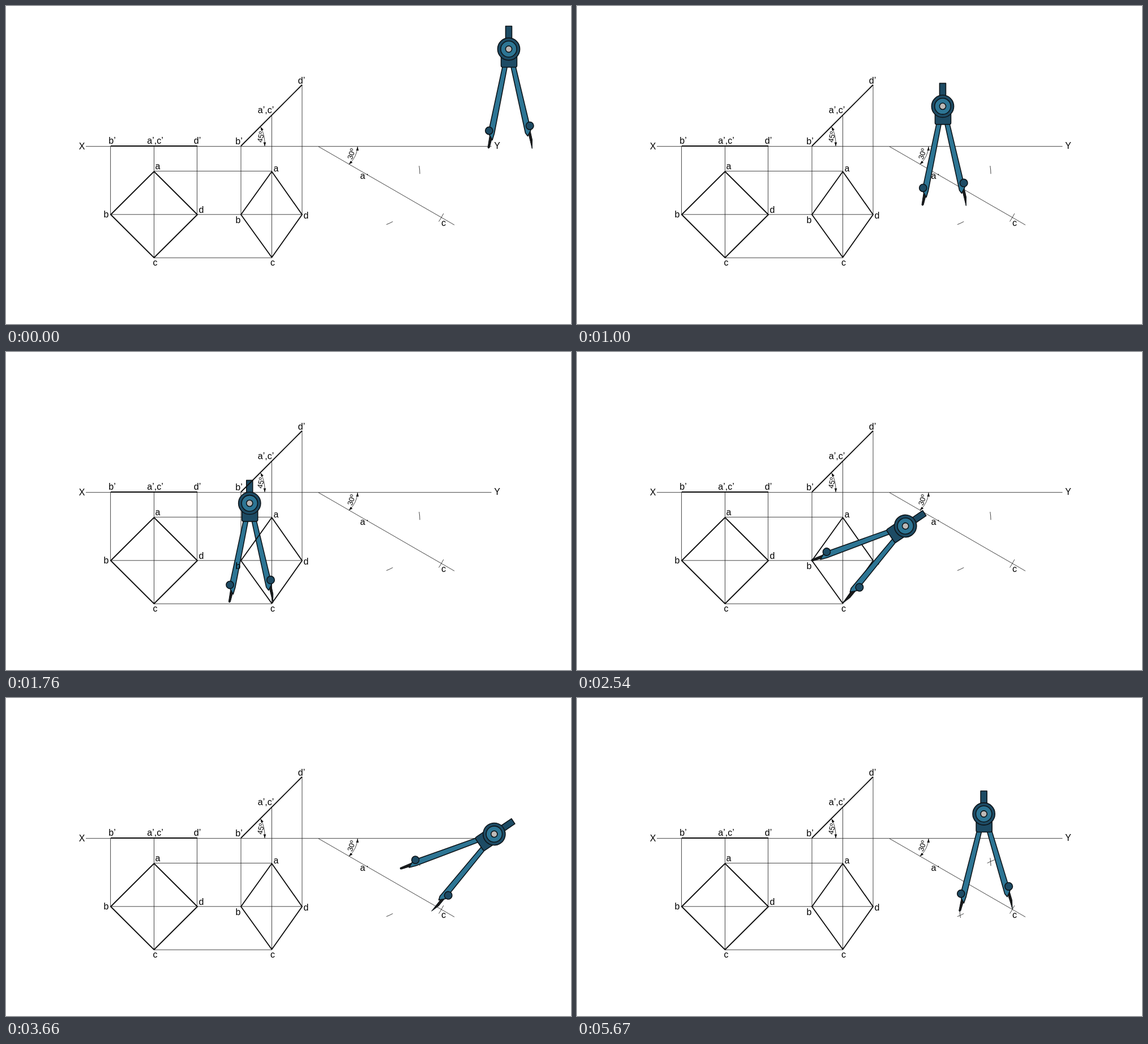
An HTML page for the animation above (5.71 s loop, 998 by 561 pixels).

```html
<!DOCTYPE html>
<html lang="en">
<head>
<meta charset="utf-8">
<title>Compass construction</title>
<style>
  html, body { margin: 0; width: 100%; height: 100%; overflow: hidden; background: #fff; }
  svg { display: block; width: 100vw; height: 100vh; }
  text { font-family: "Liberation Sans", Arial, sans-serif; font-size: 16px; text-anchor: middle; fill: #000; }
  .angle { font-size: 13px; }
  .thin { fill: none; stroke: #222; stroke-width: .85; }
  .bold { fill: none; stroke: #111; stroke-width: 1.9; stroke-linejoin: round; }
  .compass * { stroke: #0d1419; stroke-width: 1.6; stroke-linejoin: round; }
  .dark { fill: #1d4b64; }
  .blue { fill: #2d7594; }
  .grey { fill: #bdb9b7; }
  .needle { fill: #1a1a1a; }
  .compass .needle { stroke-width: 1; }
</style>
</head>
<body>
<svg viewBox="0 0 998 561">
  <g id="lines"></g>
  <g id="closed" class="compass"></g>
  <g id="shapes"></g>
  <g id="open" class="compass"></g>
</svg>
<script>
const $ = id => document.getElementById(id);
const RAD = Math.PI / 180;
const LOOP = 5710, STEP = 40;

const path = (d, cls, extra = '') => `<path d="${d}" class="${cls}" ${extra}/>`;
const label = ([s, x, y]) => `<text x="${x}" y="${y}">${s}</text>`;

function arc(cx, cy, r, from, to, extra) {
  const at = a => `${cx + r * Math.cos(a * RAD)} ${cy + r * Math.sin(a * RAD)}`;
  return path(`M${at(from)}A${r} ${r} 0 0 1 ${at(to)}`, 'thin', extra);
}

// Arrowhead with its point at x, y; 0 degrees points up.
const arrow = (x, y, turn) =>
  `<path d="M0 0L2.3 7H-2.3Z" fill="#111" transform="translate(${x} ${y}) rotate(${turn})"/>`;

const angleText = (s, x, y, turn) =>
  `<text class="angle" transform="translate(${x} ${y}) rotate(${turn})" y="4.5">${s}</text>`;

// Pivot of the closed compass, and the needle points of the open one.
const pivotFrom = [888, 76], pivotTo = [427.5, 268];
const cPoint = [470, 442.8], target = [769.3, 371.8];
const openTip = [50.7, 167.3];
const TILT = 55.9, SWING = -7.6;

const fresh = 'id="ID" pathLength="1" stroke-dasharray="0 2"';

$('lines').innerHTML =
  path('M141 247.7H857.5', 'thin') +
  path('M184.6 247V368M261.5 247V444M337.5 247V368', 'thin') +
  path('M261.5 291.3H470M185 367.8H523M261.5 444.2H469.5', 'thin') +
  path('M415 247V368M469.5 192V444M523 139V368', 'thin') +
  path('M552 248L792 386.3', 'thin') +
  path('M457 247Q458 229 450 214M621 248Q620 266 606 279', 'thin') +
  arrow(457, 247.5, 180) + arrow(449.5, 213, -28) +
  arrow(621, 248, 2) + arrow(605.5, 279.5, 225) +
  angleText('45º', 450, 231, -79) + angleText('30º', 610, 261, -72) +
  '<circle cx="638.3" cy="297.2" r="1"/>' +
  arc(638, 297, 93, -9.3, -0.5) +
  arc(638, 297, 94.8, 61.5, 69.1) +
  arc(638, 297, 151.5, 27.1, 33.4) +
  arc(...target, 93.3, 170.1, 177.7, fresh.replace('ID', 'markLow')) +
  arc(...target, 92, 241, 249.8, fresh.replace('ID', 'markHigh')) +
  [['X', 134, 253], ['Y', 867.5, 252], ['a', 630, 305], ['c', 773, 388]].map(label).join('');

$('shapes').innerHTML =
  path('M185 247H338', 'bold') +
  path('M261.5 292L185 368L261.5 444L338 368Z', 'bold') +
  path('M415 247L523 139', 'bold') +
  path('M469.5 292L415 368L469.5 443.5L523 368Z', 'bold') +
  [
    ['b’', 187.5, 243], ['a’,c’', 263.5, 243], ['d’', 338, 243],
    ['a', 268, 288], ['b', 177, 373], ['d', 345, 364.5], ['c', 263.5, 458],
    ['b’', 411.5, 244], ['a’,c’', 459, 189], ['d’', 522, 137],
    ['a', 477, 292], ['b', 410, 382.5], ['d', 530, 375], ['c', 471, 458]
  ].map(label).join('');

function compass(leftMove, rightMove) {
  const left =
    path('M-33.5 152L-29 155L-34 174Q-35.5 176 -37 174Z', 'needle') +
    path('M-8.5 20L-36 148L-29 160.5L-25.5 149L-.5 20Z', 'blue') +
    '<circle cx="-34.7" cy="144" r="6.6" class="dark"/>';
  const right =
    path('M34 146L37.5 142L41.5 160L41.3 175.5L38 162Z', 'needle') +
    path('M1.5 20L29.5 148L33.5 153.5L39 143L9.5 20Z', 'blue') +
    '<circle cx="37.2" cy="135.3" r="6.8" class="dark"/>';
  return `<g transform="${leftMove}">${left}</g><g transform="${rightMove}">${right}</g>` +
    path('M-5.5 -40.5H5.5V-18H-5.5Z', 'dark') +
    path('M-13.5 12H14.5V29Q14.5 32 11.5 32H-10.5Q-13.5 32 -13.5 29Z', 'dark') +
    '<circle r="19.6" class="dark"/><circle r="14.2" class="blue"/><circle r="5.6" class="grey"/>';
}

$('closed').innerHTML = compass('', '');
$('open').innerHTML = compass('rotate(2.4) translate(.3 -1.7)', 'rotate(-3.5) translate(-1.1 -5)');

const clamp = v => Math.min(1, Math.max(0, v));
const smooth = u => u - Math.sin(2 * Math.PI * u) / (2 * Math.PI);
const mix = (a, b, p) => a.map((v, i) => v + (b[i] - v) * p);

// Time held in 40 ms steps, counted from the start of each move.
function stepped(t) {
  const start = t < 2540 ? 0 : t < 4270 ? 2540 : 4270;
  return start + Math.floor((t - start) / STEP) * STEP;
}

function render(time) {
  const t = stepped(time % LOOP);
  const isOpen = t >= 1960;
  $('closed').style.display = isOpen ? 'none' : '';
  $('open').style.display = isOpen ? '' : 'none';

  const [px, py] = mix(pivotFrom, pivotTo, smooth(clamp(t / 1950)));
  $('closed').setAttribute('transform', `translate(${px} ${py})`);

  const swing = t < 4270 ? 0 : clamp((t - 4230) / 1440);
  const placed = t >= 3940;
  const [x, y] = placed ? target : mix(cPoint, target, smooth(clamp((t - 2505) / 1465)));
  const turn = placed ? SWING * (1 - swing) : TILT;
  $('open').setAttribute('transform',
    `translate(${x} ${y}) rotate(${turn}) translate(${-openTip[0]} ${-openTip[1]})`);

  for (const id of ['markLow', 'markHigh']) {
    $(id).style.display = swing ? '' : 'none';
    $(id).setAttribute('stroke-dasharray', `${swing} 2`);
  }
}

const began = performance.now();
function tick() {
  render(performance.now() - began);
  requestAnimationFrame(tick);
}
tick();
</script>
</body>
</html>
```
